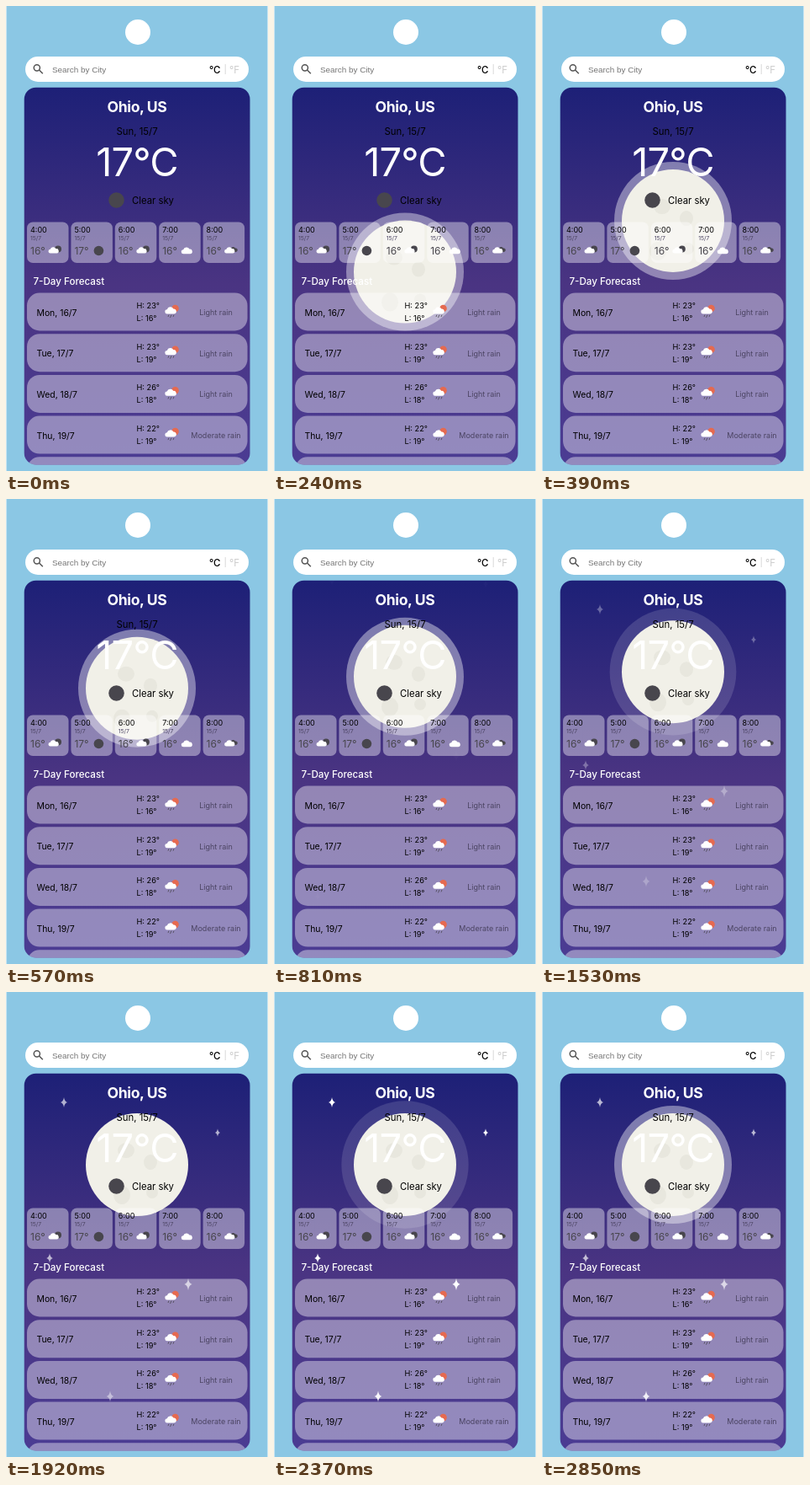
An HTML page for the animation above (2880 ms loop, 312 by 552 pixels).

```html
<!DOCTYPE html>
<html lang="en">
<head>
<meta charset="utf-8">
<title>Weather</title>
<style>
  html, body { margin: 0; width: 100%; height: 100%; overflow: hidden; background: #8bc7e4; }
  svg { display: block; font-family: Inter, "Open Sans", sans-serif; }
  .mid { text-anchor: middle; }
  .card { fill: #fff; fill-opacity: .4; }
  .white { fill: #fff; }
  .dark { fill: #48464d; }
  .soft { fill: #4b4462; }
</style>
</head>
<body>
<svg id="stage" width="312" height="552" viewBox="0 0 312 552">
  <defs>
    <linearGradient id="night" x2="0" y2="1">
      <stop stop-color="#1d2077"/>
      <stop offset=".52" stop-color="#4a3482"/>
      <stop offset="1" stop-color="#4b3c93"/>
    </linearGradient>
    <clipPath id="panel"><rect x="21.700" y="96.700" width="268.800" height="448" rx="14"/></clipPath>
    <path id="cloud" d="M-5 4.500a3 3 0 0 1-.3-6A4.600 4.600 0 0 1 3.200-2.300 3.400 3.400 0 0 1 4.300 4.500Z"/>
    <path id="spark" d="M0-6Q.7-.9 4 0 .7.900 0 6-.7.900-4 0-.7-.9 0-6Z"/>
  </defs>

  <path d="M.5 0v552M311.500 0v552" stroke="#fff" stroke-opacity=".5"/>
  <circle class="white" cx="157" cy="31" r="15"/>

  <rect class="white" x="23" y="60" width="266" height="30" rx="15"/>
  <g fill="none" stroke="#555" stroke-width="1.500">
    <circle cx="36.800" cy="73.300" r="3.600"/>
    <path d="M39.500 76l4.300 4.300"/>
  </g>
  <text x="55" y="79" font-size="9.900" fill="#757575" font-family="Liberation Sans, Arial, sans-serif">Search by City</text>
  <g font-size="11.500">
    <text x="242" y="79.500" font-weight="500">°C</text>
    <text x="259.500" y="78.500" fill="#ccc" font-size="10">|</text>
    <text x="266" y="79.500" fill="#ccc">°F</text>
  </g>

  <g clip-path="url(#panel)">
    <rect x="21" y="96" width="270" height="449" fill="url(#night)"/>
    <g id="moon">
      <circle id="halo" fill="#fff"/>
      <circle r="61" fill="#f1f0e8"/>
      <g fill="#e8e7de">
        <ellipse cx="16" cy="-3" rx="8" ry="9"/>
        <ellipse cx="-13" cy="-17" rx="10" ry="9"/>
        <ellipse cx="-18" cy="36" rx="10" ry="11"/>
        <circle cx="18" cy="33" r="7"/>
      </g>
    </g>
    <g id="stars" class="white"></g>

    <g class="mid">
      <text class="white" x="156" y="126" font-size="17.600" font-weight="700" letter-spacing="-.4">Ohio, US</text>
      <text x="156" y="152.500" font-size="11.400">Sun, 15/7</text>
      <text class="white" x="156" y="201.500" font-size="47" letter-spacing="-.9">17°C</text>
    </g>
    <circle class="dark" cx="131.500" cy="230.500" r="9.300"/>
    <text x="150" y="235" font-size="11.300">Clear sky</text>
    <g id="hours"></g>
    <text class="white" x="32.500" y="331" font-size="11.600" font-weight="500">7-Day Forecast</text>
    <g id="days"></g>
  </g>
</svg>
<script>
const $ = id => document.getElementById(id);
const LOOP = 2880;

const cloud = (x, y, scale, cls = 'white') =>
  `<use href="#cloud" class="${cls}" transform="translate(${x} ${y}) scale(${scale})"/>`;

const skies = {
  clear: `<circle class="dark" cx="33" cy="34" r="5.800"/>`,
  cloudy: cloud(33.5, 34, .85),
  partly: `<circle class="dark" cx="37" cy="32" r="4"/>` + cloud(32, 33.500, .8),
  broken: cloud(36.500, 32.500, .65, 'dark') + cloud(32, 33.500, .8)
};
const hours = [[16, 'partly'], [17, 'clear'], [16, 'partly'], [16, 'cloudy'], [16, 'broken']];

$('hours').innerHTML = hours.map(([temp, sky], i) => `
  <g transform="translate(${25 + i * 52.4} 256.500)">
    <rect class="card" width="49.500" height="48.500" rx="7"/>
    <text x="4" y="12" font-size="9">${i + 4}:00</text>
    <text class="soft" x="4" y="21" font-size="6.800">15/7</text>
    <text class="dark" x="4" y="38.500" font-size="12">${temp}°</text>
    ${skies[sky]}
  </g>`).join('');

const rain = `
  <circle cx="176.500" cy="18.500" r="4.300" fill="#e56a50"/>
  ${cloud(171.500, 21, .88)}
  <path d="M169 26l-1 2.500M172 26l-1.500 3.500M175 26l-1 2.500" stroke="#48464d" stroke-width=".8"/>`;
const days = [
  ['Mon, 16/7', 23, 16, 'Light rain'],
  ['Tue, 17/7', 23, 19, 'Light rain'],
  ['Wed, 18/7', 26, 18, 'Light rain'],
  ['Thu, 19/7', 22, 19, 'Moderate rain'],
  ['Fri, 20/7', 22, 18, 'Light rain']
];

$('days').innerHTML = days.map(([day, high, low, sky], i) => `
  <g transform="translate(25 ${340.5 + i * 48.7})">
    <rect class="card" width="262.500" height="45" rx="15"/>
    <text x="11.500" y="27" font-size="10.400">${day}</text>
    <g font-size="9.200">
      <text x="130.500" y="18.500">H: ${high}°</text>
      <text x="130.500" y="33.500">L: ${low}°</text>
    </g>
    ${rain}
    <text class="soft mid" x="225" y="26.500" font-size="9">${sky}</text>
  </g>`).join('');

// x, resting y, starting offset, size, delay in seconds
const stars = [
  [69, 131, -34, 1, 0],
  [252, 167, -66, .8, 0],
  [217, 347, -42, 1.15, 0],
  [52, 316, 156, .95, 0],
  [124, 480, -70, 1.1, .35]
];
$('stars').innerHTML = '<use href="#spark"/>'.repeat(stars.length);

const clamp = v => Math.min(1, Math.max(0, v));
const smooth = v => v * v * (3 - 2 * v);

function draw(t) {
  const y = 205 + 430 * Math.exp(-5.25 * t ** .95);
  $('moon').setAttribute('transform', `translate(156 ${y})`);

  const pulse = (1 - Math.cos(2 * Math.PI * clamp((t - 1.06) / 1.8))) / 2;
  $('halo').setAttribute('r', 70 + 10 * pulse);
  $('halo').setAttribute('opacity', .4 * (1 - pulse) ** 1.4);

  stars.forEach(([x, rest, offset, size, delay], i) => {
    const age = t - delay - .8;
    const left = 1 - smooth(clamp(age / .65));
    const twinkle = .65 + .35 * Math.cos((t - delay / 2 - 2.4) * Math.PI / .95);
    const star = $('stars').children[i];
    star.setAttribute('transform', `translate(${x} ${rest + offset * left}) scale(${size})`);
    star.setAttribute('opacity', clamp(age / .5) * twinkle);
  });
}

const start = performance.now();
function tick() {
  draw((performance.now() - start) % LOOP / 1000);
  requestAnimationFrame(tick);
}
tick();
</script>
</body>
</html>
```
